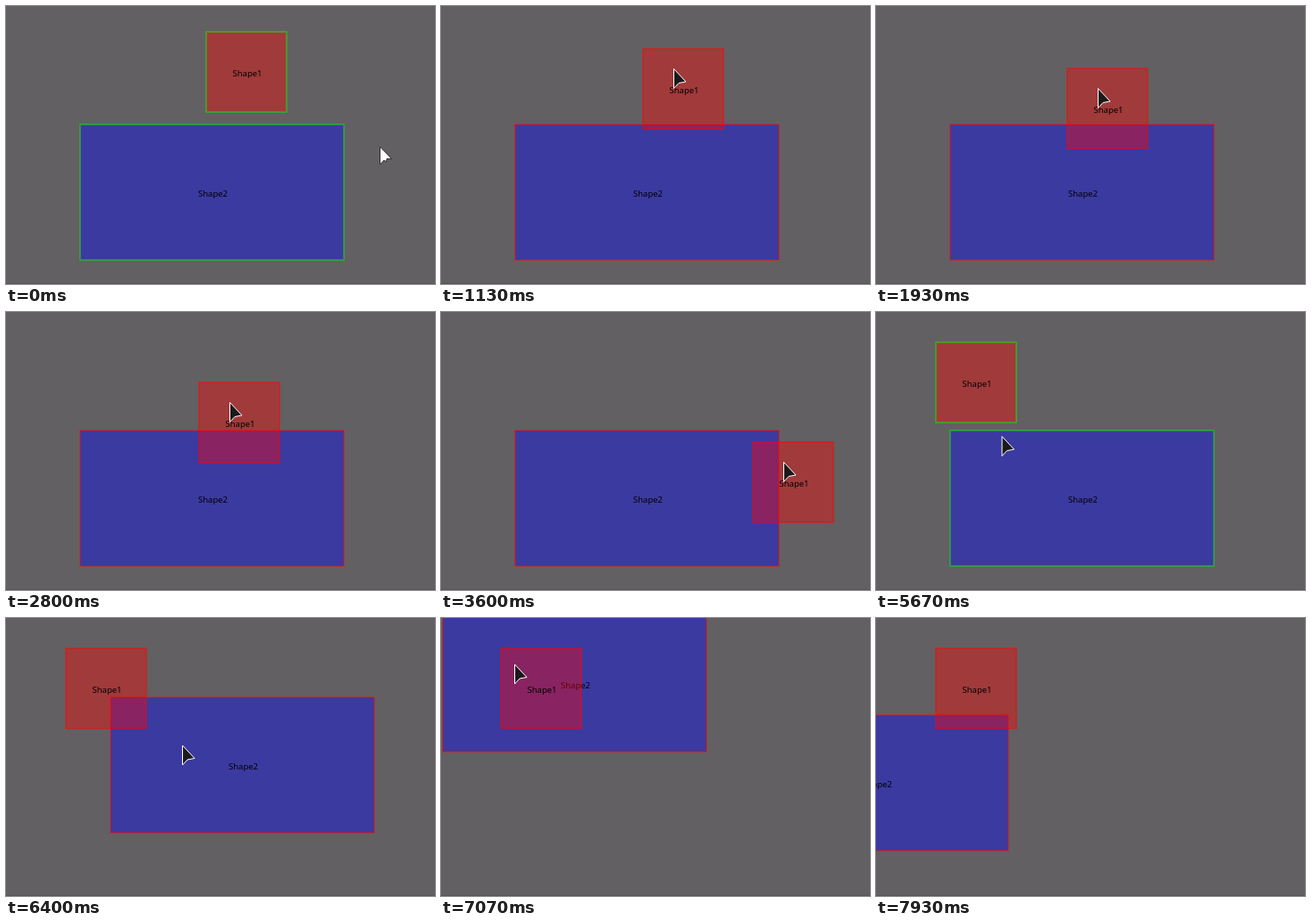
These frames come from a looping animation (480 by 312 pixels, 8 s). An HTML page with a canvas:

```html
<!DOCTYPE html>
<html lang="en">
<head>
<meta charset="utf-8">
<title>Shape overlap</title>
<style>
html, body { margin: 0; width: 100%; height: 100%; overflow: hidden; background: #626062; }
canvas { display: block; }
</style>
</head>
<body>
<canvas id="stage" width="480" height="312"></canvas>
<script>
const ctx = document.getElementById('stage').getContext('2d');
const LOOP = 8000, FPS = 15;
const tint = rgb => `rgba(${rgb},.4)`;
const RED = tint('255,0,0'), GREEN = tint('0,255,0'), BLUE = tint('0,0,255');

// Turning points of the two drags: [ms, x, y]
const redPath = [
  [600, 224, 29], [1133, 226, 48], [1600, 213, 89], [1733, 213, 89],
  [2267, 217, 29], [2533, 217, 29], [2800, 216, 79], [3400, 338, 121],
  [4000, 360, 205], [4467, 214, 245], [5000, 26, 140], [5400, 67, 34]
];
const bluePath = [
  [5933, 83, 133], [6400, 117, 89], [6867, 56, 6],
  [7067, 2, -2], [7733, -141, 66], [7933, -147, 109]
];

const ease = u => u * u * (3 - 2 * u);
const mix = (a, b, u) => a + (b - a) * u;

function slope(keys, i, c) {
  if (i === 0 || i === keys.length - 1) return 0;
  const rate = j => (keys[j + 1][c] - keys[j][c]) / (keys[j + 1][0] - keys[j][0]);
  const a = rate(i - 1), b = rate(i);
  return a * b <= 0 ? 0 : 2 * a * b / (a + b);
}

// Smooth curve through the keys without overshoot, on whole pixels
function follow(keys, t) {
  const last = keys.length - 1;
  t = Math.min(Math.max(t, keys[0][0]), keys[last][0]);
  const i = Math.max(0, keys.findIndex(k => k[0] >= t) - 1);
  const p = keys[i], q = keys[i + 1], d = q[0] - p[0], u = (t - p[0]) / d;
  return [1, 2].map(c => Math.round(mix(p[c], q[c], ease(u)) +
    d * u * (1 - u) * (slope(keys, i, c) * (1 - u) - slope(keys, i + 1, c) * u)));
}

function glide(from, to, start, end, t) {
  const u = ease(Math.min(1, (t - start) / (end - start)));
  return from.map((v, i) => mix(v, to[i], u));
}

const inside = ([x, y], r) => x >= r.x && x <= r.x + r.w && y >= r.y && y <= r.y + r.h;
const overlap = (a, b) => a.x < b.x + b.w && b.x < a.x + a.w && a.y < b.y + b.h && b.y < a.y + a.h;
const grip = (r, dx, dy) => [r.x + dx, r.y + dy];

function drawShape(r, line) {
  ctx.fillStyle = r.fill;
  ctx.fillRect(r.x, r.y, r.w, r.h);
  ctx.strokeStyle = line;
  ctx.lineWidth = 2;
  ctx.strokeRect(r.x, r.y, r.w, r.h);
  ctx.fillStyle = '#000';
  ctx.fillText(r.label, r.x + r.w / 2 + 1, r.y + r.h / 2 + 5);
}

function drawCursor([x, y], over) {
  const pts = over
    ? [[0, 0], [0, 22], [5.5, 16], [13.5, 14.5]]
    : [[0, 0], [0, 20], [4.5, 15], [7, 17], [7.5, 13.5], [13, 13.5]];
  ctx.beginPath();
  pts.forEach(([a, b]) => ctx.lineTo(x + a, y + b));
  ctx.closePath();
  ctx.fillStyle = over ? '#1b1a1b' : '#fff';
  ctx.strokeStyle = over ? '#fff' : '#343334';
  ctx.lineWidth = 1;
  ctx.lineJoin = 'round';
  ctx.fill();
  ctx.stroke();
}

function cursorAt(t, red, blue) {
  const onRed = grip(red, 34.5, 22.5), onBlue = grip(blue, 80.5, 54);
  if (t < 533) return glide([418.5, 158], onRed, 0, 533, t);
  if (t < 5400) return onRed;
  return glide(onRed, onBlue, 5400, 5850, t);
}

function draw(t) {
  const [rx, ry] = follow(redPath, t), [bx, by] = follow(bluePath, t);
  const red = { x: rx, y: ry, w: 90, h: 90, label: 'Shape1', fill: RED };
  const blue = { x: bx, y: by, w: 295, h: 152, label: 'Shape2', fill: BLUE };
  ctx.fillStyle = '#626062';
  ctx.fillRect(0, 0, 480, 312);
  ctx.fillStyle = '#575557';
  ctx.fillRect(0, 311, 480, 1);
  ctx.font = '500 9.5px "Noto Sans", "Open Sans", sans-serif';
  ctx.textAlign = 'center';
  const line = overlap(red, blue) ? RED : GREEN;
  drawShape(blue, line);
  drawShape(red, line);
  const tip = cursorAt(t, red, blue);
  drawCursor(tip, inside(tip, red) || inside(tip, blue));
}

const start = performance.now();
function tick() {
  const ms = Math.max(0, performance.now() - start) % LOOP;
  const step = Math.floor((ms + 4) * FPS / 1000) % (LOOP * FPS / 1000);
  draw(step * 1000 / FPS);
  requestAnimationFrame(tick);
}
tick();
</script>
</body>
</html>
```
